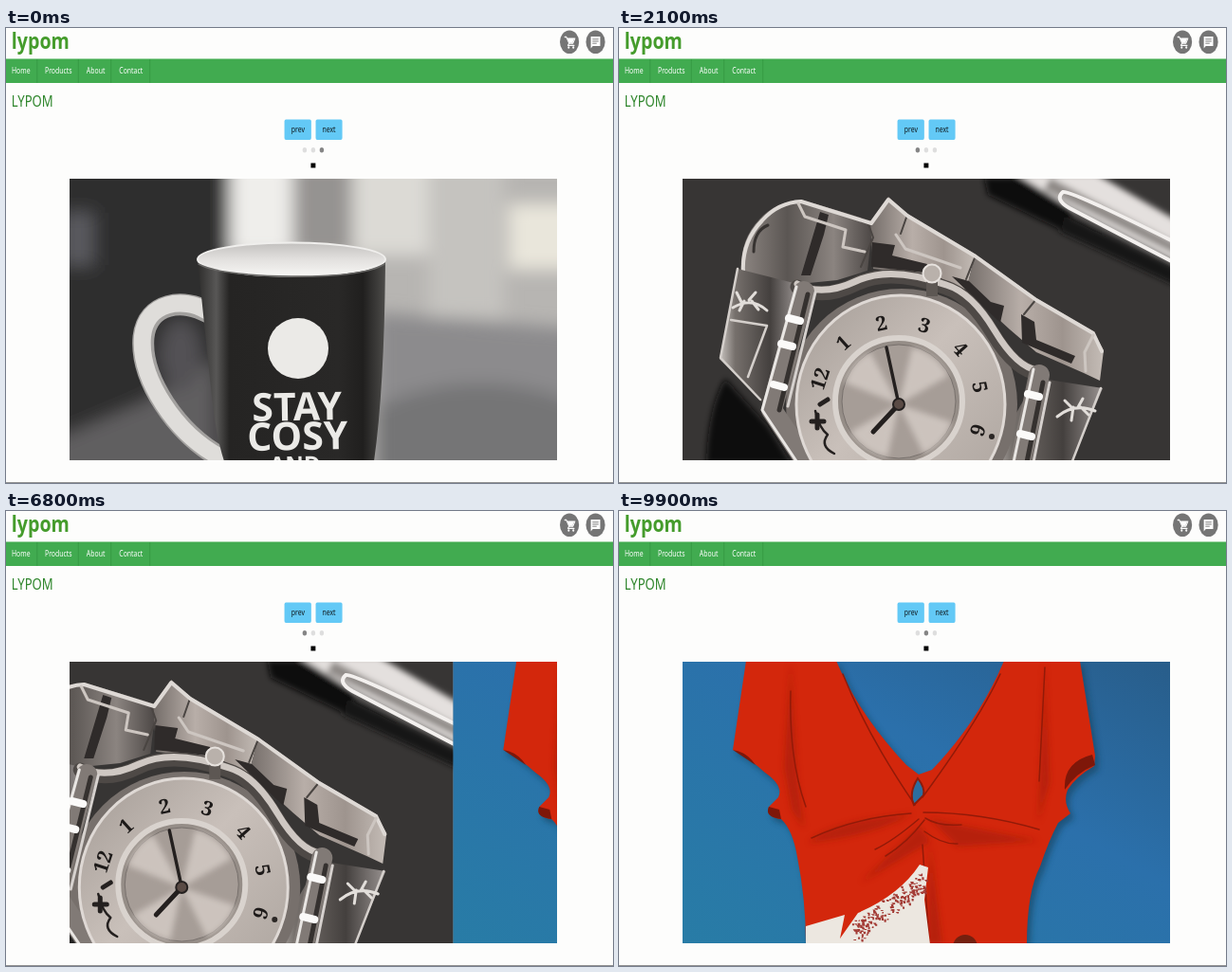
An HTML page that plays this animation: 640 px wide and 480 px high, repeating every 10000 ms.

```html
<!DOCTYPE html>
<html lang="en">
<head>
<meta charset="utf-8">
<title>Shop slider</title>
<style>
html, body { margin: 0; width: 100%; height: 100%; overflow: hidden; background: #fdfdfc; }
svg { display: block; width: 640px; height: 480px; }
text { font-family: "Noto Sans", "Open Sans", sans-serif; }
.small { font-size: 8.4px; font-weight: 500; }
.mid { text-anchor: middle; }
.line { fill: none; stroke-linecap: round; stroke-linejoin: round; }
.serif { font: bold 21px "Noto Serif", serif; text-anchor: middle; }
</style>
</head>
<body>
<svg viewBox="0 0 640 480">
<defs>
  <clipPath id="view"><rect x="67" y="159" width="514" height="297"/></clipPath>
  <clipPath id="frame"><rect x="67" y="159" width="514.5" height="297"/></clipPath>
  <filter id="soft" x="-30%" y="-30%" width="160%" height="160%"><feGaussianBlur stdDeviation="9"/></filter>
  <filter id="haze" x="-30%" y="-30%" width="160%" height="160%"><feGaussianBlur stdDeviation="3"/></filter>
  <linearGradient id="mugSide">
    <stop offset="0" stop-color="#2e2d2c"/><stop offset=".1" stop-color="#585756"/>
    <stop offset=".17" stop-color="#252423"/><stop offset=".75" stop-color="#292827"/>
    <stop offset=".88" stop-color="#201f1e"/><stop offset="1" stop-color="#4d4c4a"/>
  </linearGradient>
  <linearGradient id="inside" x2="0" y2="1">
    <stop offset="0" stop-color="#c2c0be"/><stop offset=".5" stop-color="#e2e0de"/><stop offset="1" stop-color="#f7f6f4"/>
  </linearGradient>
  <linearGradient id="loop">
    <stop offset="0" stop-color="#8d8682"/><stop offset=".35" stop-color="#5b5653"/>
    <stop offset=".7" stop-color="#8b8480"/><stop offset="1" stop-color="#4b4644"/>
  </linearGradient>
  <linearGradient id="links">
    <stop offset="0" stop-color="#746d69"/><stop offset=".4" stop-color="#b8aea8"/>
    <stop offset=".7" stop-color="#9e948e"/><stop offset="1" stop-color="#c4bcb6"/>
  </linearGradient>
  <linearGradient id="strap">
    <stop offset="0" stop-color="#c9c4c0"/><stop offset=".2" stop-color="#76706c"/>
    <stop offset=".65" stop-color="#44403e"/><stop offset="1" stop-color="#989290"/>
  </linearGradient>
  <linearGradient id="dial" x2="1" y2="1">
    <stop offset="0" stop-color="#a39b95"/><stop offset=".45" stop-color="#c9c0ba"/><stop offset="1" stop-color="#aaa29c"/>
  </linearGradient>
  <linearGradient id="wall" x1="0" y1="1" x2="1" y2="0">
    <stop offset="0" stop-color="#287ca6"/><stop offset=".6" stop-color="#2b70ab"/><stop offset="1" stop-color="#285d8a"/>
  </linearGradient>
</defs>

<rect width="640" height="480" fill="#fdfdfc"/>
<g transform="scale(.82 1)">
  <text x="7" y="22" font-size="24" font-weight="700" fill="#459c2c">lypom</text>
  <rect y="32.5" width="781" height="25.5" fill="#41ab50"/>
  <path d="M40 33v25M93 33v25M135 33v25M185 33v25" stroke="#379944"/>
  <g class="small" fill="#fff">
    <text x="7.3" y="48.5">Home</text><text x="50" y="48.5">Products</text>
    <text x="103.5" y="48.5">About</text><text x="145.5" y="48.5">Contact</text>
  </g>
  <text x="7" y="83" font-size="16" font-weight="500" fill="#2f862c">LYPOM</text>
  <g fill="#757575"><circle cx="724.5" cy="14.7" r="12.3"/><circle cx="758" cy="14.7" r="12.3"/></g>
  <g fill="#fff">
    <path class="line" d="M718.5 9.5h2l3.5 6.500h5l2.500-5M724 16l-1.500 2.300h8" stroke="#fff" stroke-width="1.300"/>
    <path d="M721.500 10.500h9.500l-2.500 5h-4.500z"/><circle cx="723.500" cy="20.500" r="1.200"/><circle cx="729.500" cy="20.500" r="1.200"/>
    <path d="M752 9h12v10h-9.500l-2.500 2.500z"/>
  </g>
  <path d="M754 11.800h8M754 14h8M754 16.200h5.500" stroke="#757575"/>
  <g fill="#63c9f6"><rect x="358" y="96.500" width="34.500" height="21.500" rx="2"/><rect x="398.200" y="96.500" width="34.200" height="21.500" rx="2"/></g>
  <g class="small mid" fill="#10191d"><text x="375.500" y="110.500">prev</text><text x="415.300" y="110.500">next</text></g>
  <g id="dots"><circle cx="384" cy="128.800" r="2.700"/><circle cx="395" cy="128.800" r="2.700"/><circle cx="406" cy="128.800" r="2.700"/></g>
  <rect x="392" y="142.500" width="6" height="5"/>
</g>
<path d="M0 479.500h640" stroke="#939393"/>

<g clip-path="url(#view)"><g id="track">
  <!-- mug -->
  <g clip-path="url(#frame)">
    <rect x="67" y="159" width="515" height="297" fill="#b7b5b2"/>
    <g filter="url(#soft)">
      <path d="M40 130H236V470H40z" fill="#2f2e2d"/>
      <path d="M60 195h32v55H60z" fill="#5a5a5e"/>
      <path d="M236 140h66v100h-66z" fill="#efeeeb"/>
      <path d="M303 140h62v100h-62z" fill="#959391"/>
      <path d="M365 140h80v100h-80z" fill="#dcdad5"/>
      <path d="M445 140h80v165h-80z" fill="#c5c3bf"/>
      <path d="M530 185h80v70h-80z" fill="#e9e6db"/>
      <path d="M390 300L610 318V480H390z" fill="#8c8b8d"/>
      <path d="M390 400Q500 350 610 400V480H390z" fill="#757476"/>
      <path d="M50 435L145 395 220 350V480H50z" fill="#605f60"/>
      <ellipse cx="184" cy="345" rx="22" ry="38" fill="#525154"/>
    </g>
    <path class="line" d="M213 300C188 285 149 289 145 326C141 370 180 428 228 454" stroke="#a3a19f" stroke-width="23"/>
    <path class="line" d="M211 298C188 284 148 288 144 325C140 370 179 428 226 453" stroke="#dfddda" stroke-width="18"/>
    <path d="M202 244L216 380Q221 430 230 457H388Q399 380 400 244z" fill="url(#mugSide)"/>
    <ellipse cx="301" cy="244" rx="99" ry="17.500" fill="url(#inside)" stroke="#f0efed" stroke-width="2"/>
    <path class="line" d="M203 249Q225 261 301 262T399 249" stroke="#696866" stroke-width="1.500"/>
    <g fill="#ebeae7">
      <circle cx="308" cy="338" r="32"/>
      <g class="mid" font-weight="700" transform="rotate(-1 307 415)">
        <text x="307" y="414" font-size="41">STAY</text>
        <text x="307" y="445" font-size="41">COSY</text>
        <text x="304" y="469" font-size="24">AND</text>
      </g>
    </g>
  </g>

  <!-- watch -->
  <g transform="translate(514)"><g clip-path="url(#frame)">
    <rect x="67" y="159" width="515" height="297" fill="#373534"/>
    <g filter="url(#haze)">
      <path d="M385 158h40l55 30-8 28-83-40z" fill="#0b0a0a"/>
      <path d="M470 197L590 255v18L465 215z" fill="#151414"/>
      <path d="M418 154h85l90 52v44L485 195z" fill="#e4e0de"/>
      <path d="M455 158l138 72v12L448 170z" fill="#8e8986"/>
      <path d="M112 370l45 50 25 40H92Q94 400 112 370z" fill="#100f0f"/>
    </g>
    <path class="line" d="M590 250L475 190Q459 181 468 173Q476 171 590 228" stroke="#f3f0ee" stroke-width="4"/>

    <!-- back of the bracelet -->
    <path d="M129 262Q126 225 148 202Q165 183 192 181L268 204 262 256 230 266 190 270z" fill="url(#loop)"/>
    <path d="M265 204L284 178 304 196 376 239 366 276 330 260 268 254z" fill="url(#links)"/>
    <path d="M376 239L440 285 500 320 511 340 507 372 490 364 440 342 412 318 366 276z" fill="url(#links)"/>
    <g fill="#2f2b2a">
      <path d="M267 226l24 3-3 11 37 9-4 9-55-6zM351 262l18 5 23 22 14 4-4 18z"/>
      <path d="M424 302l14 8 2 19 41 17-4 8-52-22zM212 194l9 3-5 21-14 43h-10z"/>
    </g>
    <g class="line">
      <path d="M262 204l6 17-13 31M304 197l-7 20M376 240l-10 25M440 286l-13 16" stroke="#4a4542" stroke-width="2"/>
      <path d="M131 258Q129 226 151 203Q168 184 192 183L266 206 284 181 304 198 376 241 440 287 500 322 509 341" stroke="#ded9d5" stroke-width="4"/>
      <path d="M189 185l7 14 43 14-3 18 23 5M292 218l10 15 58 20M500 324l-9 18 1 20" stroke="#cdc6c1" stroke-width="3"/>
      <path d="M142 236q0-22 15-28" stroke="#373331" stroke-width="3"/>
    </g>

    <!-- front straps -->
    <path d="M125 254L188 270 154 398 106 349z" fill="url(#strap)"/>
    <path d="M440 369L510 380 478 457H390z" fill="url(#strap)"/>
    <path class="line" d="M125 254L107 348 149 392M118 308l38 6-20 54M508 380L478 457" stroke="#d4cfcb" stroke-width="2.500"/>
    <g class="line" stroke="#e2deda" stroke-width="3">
      <path d="M120 295q20-12 36 3m-27-9l-5-10m13 8l7-8m-12 9l-5 10m13-10l7 9"/>
      <path d="M462 410q18-15 40-6m-24-3l-8-8m14 7l5-9m-10 9l-2 14m10-14l8 8"/>
    </g>

    <!-- case -->
    <circle cx="298" cy="397" r="122" fill="#77706c"/>
    <g class="line">
      <path d="M188 273Q214 288 250 270T345 274Q370 282 394 322T442 364" stroke="#4e4946" stroke-width="15"/>
      <path d="M188 270Q214 284 250 267T345 271Q372 279 396 319T442 361" stroke="#cfc8c3" stroke-width="7"/>
      <path d="M195 278L161 403 197 457M443 366L423 460" stroke="#817a76" stroke-width="22"/>
      <path d="M187 273L151 403 187 457M437 360L416 458" stroke="#e9e6e3" stroke-width="3"/>
      <path d="M199 281L169 403M447 374L430 458" stroke="#35312f" stroke-width="5"/>
      <path d="M207 279L178 399M454 374L437 458" stroke="#d6d1ce" stroke-width="3"/>
      <path d="M179 306l12 3M171 333l12 3M163 376l11 3M431 386l12 3M423 428l12 3" stroke="#fbfaf9" stroke-width="8"/>
    </g>
    <path d="M324 265h12v18h-12z" fill="#5d5753"/>
    <circle cx="330" cy="259" r="9.500" fill="#b9b1ab" stroke="#e7e2de" stroke-width="2"/>

    <!-- dial -->
    <ellipse cx="297" cy="397" rx="110" ry="115" fill="url(#dial)" stroke="#dfd9d5" stroke-width="3"/>
    <circle cx="295" cy="394" r="67" fill="#958d87" stroke="#d9d3ce" stroke-width="6"/>
    <circle cx="295" cy="394" r="60" fill="#a69d97" stroke="#77706c"/>
    <path d="M295 397L238 374Q246 350 265 342zM295 397L309 337Q335 343 347 367zM295 397L351 416Q341 442 321 449zM295 397L283 453Q257 447 244 426z" fill="#d6cdc7" opacity=".8" filter="url(#haze)"/>
    <g id="hours" fill="#1d1a19"></g>
    <g class="line" stroke="#24201f">
      <path d="M295 397L282 337" stroke-width="3.500"/><path d="M295 397L268 426" stroke-width="5"/>
      <path d="M207 404q4 18 13 25q-9 12 7 20" stroke-width="2.500"/>
      <path d="M209 408v14M203 415h13M212 397l8-5" stroke-width="5"/>
    </g>
    <circle cx="295" cy="397" r="6" fill="#5a4b45" stroke="#24201f" stroke-width="2"/>
    <circle cx="393" cy="431" r="3" fill="#2b2725"/>
  </g></g>

  <!-- shirt -->
  <g transform="translate(1028)"><g clip-path="url(#frame)">
    <rect x="67" y="159" width="515" height="297" fill="url(#wall)"/>
    <g id="shade" filter="url(#haze)" transform="translate(4 5)" fill="#164562" opacity=".65"></g>
    <path id="cloth" d="M134 158L120 252Q134 258 154 276Q174 290 168 302L158 312Q154 323 171 325Q183 336 188 365Q197 410 197 457H430Q430 402 444 375Q453 348 463 329L476 319Q468 307 473 294Q482 280 501 269L502 258 486 158H406Q379 222 330 273L316 278 303 268Q253 215 229 158z" fill="#d3270c"/>
    <g filter="url(#haze)" fill="#a31c08" opacity=".6">
      <path d="M181 158l7 125 7 52-13-20-8-45z"/><path d="M449 158l-7 170 12-42z"/>
      <path d="M200 350q18-22 110-31-43 24-110 31zM317 332l-62 60 73-43zM327 324l30 30 86-6-81-16zM328 350l13 107h-16z"/>
    </g>
    <path d="M470 294Q468 265 499 257L502 268Q482 276 470 294zM120 252q15 2 24 16zM158 312l11 3 2 10q-18-2-13-13z" fill="#7e1709"/>
    <path d="M315 282q8 10 6 18l-10 10q-6-12 4-28z" fill="#2c6e9f" stroke="#8e1b0a" stroke-width="2"/>
    <g class="line" stroke="#921a08" stroke-width="1.500">
      <path d="M236 172Q262 237 312 310M402 172Q378 223 320 302M181 190q-2 72 16 122M449 165l-6 120"/>
      <path d="M308 319Q250 323 203 345M316 325Q289 348 270 357M322 326Q304 350 281 364M323 324Q337 333 361 331M322 338Q341 352 357 351M320 352L327 457M321 318Q382 318 443 336"/>
    </g>
    <path d="M197 438L238 426 233 451 252 424Q296 405 317 373L326 376 322 410 328 457H197z" fill="#ece7e0"/>
    <g id="specks" fill="#a33b35"></g>
    <circle cx="365" cy="460" r="13" fill="#74200f"/>
  </g></g>
</g></g>
</svg>
<script>
const $ = id => document.getElementById(id);
const LOOP = 10000, STEP = 100, WIDTH = 514, SLIDE = 300;
const starts = [1751, 6751];
const dots = [...$('dots').children];

let marks = '';
[12, 1, 2, 3, 4, 5, 6].forEach((n, i) => {
  marks += `<text class="serif" transform="translate(295 397) rotate(${i * 30 - 72}) translate(0 -80)">${n}</text>`;
});
$('hours').innerHTML = marks;
$('shade').innerHTML = `<path d="${$('cloth').getAttribute('d')}"/>`;

// Worn print: a seeded scatter along the diagonal.
let seed = 17;
const rand = () => (seed = seed * 16807 % 2147483647) / 2147483647;
let flecks = '';
for (let i = 0; i < 170; i++) {
  const u = rand(), x = 245 + u * 73 + rand() * 7, y = 444 - u * 55 + (rand() - .5) * 23;
  flecks += `M${x} ${y}h${1 + rand() * 3}v${1 + rand() * 2}h-2z`;
}
$('specks').innerHTML = `<path d="${flecks}"/>`;

// CSS "ease", cubic-bezier(.25, .1, .25, 1), solved by bisection.
function ease(x) {
  if (x <= 0) return 0;
  if (x >= 1) return 1;
  let lo = 0, hi = 1;
  for (let i = 0; i < 24; i++) {
    const s = (lo + hi) / 2;
    if (.75 * s * (1 - s) + s ** 3 < x) lo = s; else hi = s;
  }
  return .3 * lo * (1 - lo) ** 2 + 3 * lo * lo * (1 - lo) + lo ** 3;
}

const begin = performance.now();
function draw() {
  const time = Math.floor(((performance.now() - begin) % LOOP) / STEP) * STEP;
  const place = starts.reduce((sum, at) => sum + ease((time - at) / SLIDE), 0);
  $('track').setAttribute('transform', `translate(${-place * WIDTH})`);
  const active = (Math.round(place) + 2) % 3;
  dots.forEach((dot, i) => dot.setAttribute('fill', i === active ? '#858585' : '#dedede'));
  requestAnimationFrame(draw);
}
draw();
</script>
</body>
</html>
```
